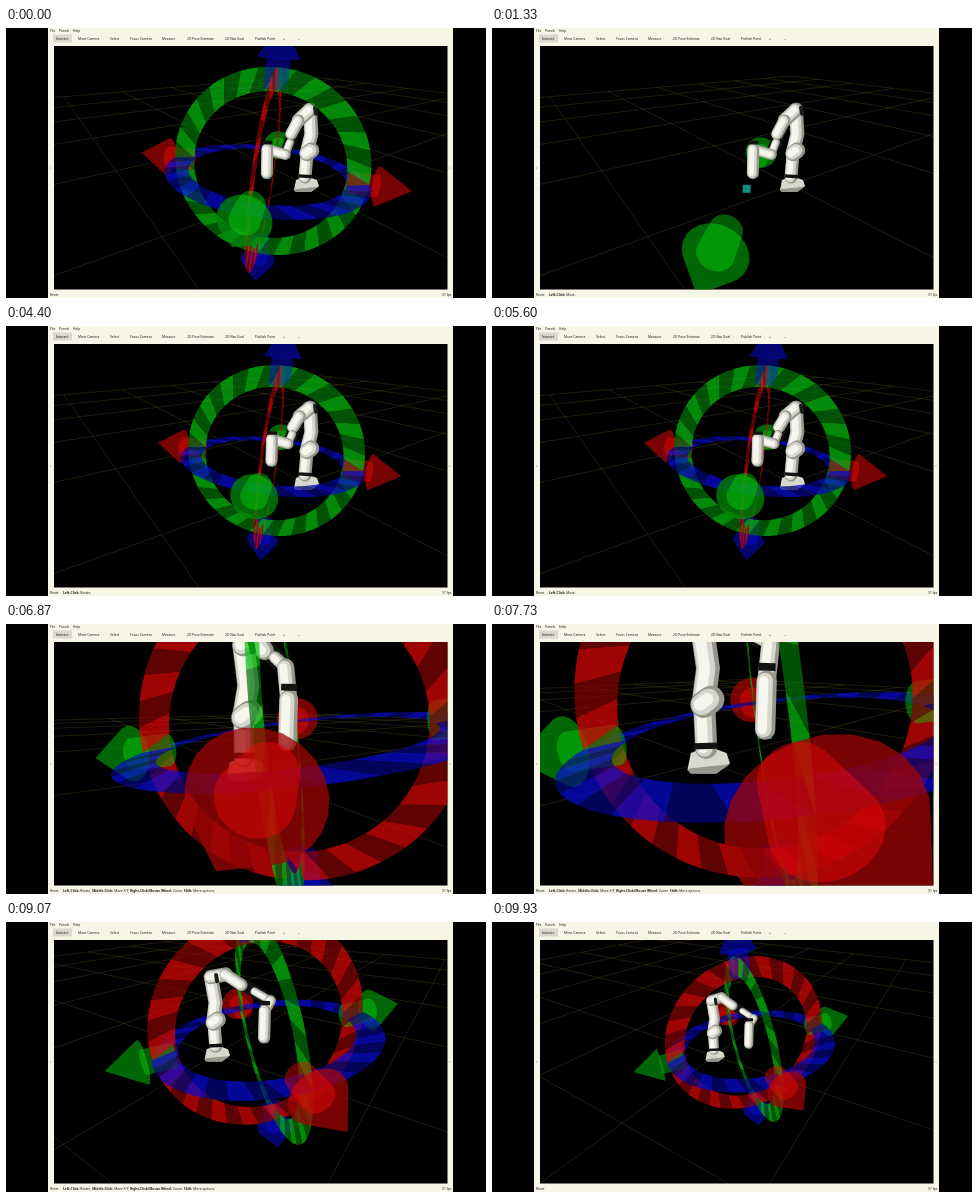
Recreate the animation shown at these times as an HTML page with a canvas. Size 480x270 px, loop 10000 ms.

```html
<!DOCTYPE html>
<html lang="en">
<head>
<meta charset="utf-8">
<style>
  html, body { margin: 0; width: 100%; height: 100%; overflow: hidden; background: #000; }
  canvas { display: block; }
</style>
</head>
<body>
<canvas id="stage" width="480" height="270"></canvas>
<script>
const ctx = document.getElementById('stage').getContext('2d');
const { sin, cos, PI } = Math;
const LOOP = 10000, STEP = LOOP / 150;
const FOCAL = 293, CX = 244.5, CY = 139.5;
const OUTER = 0.335, INNER = 0.262;
const RED = [225, 6, 6], GREEN = [4, 195, 14], BLUE = [8, 10, 215];

// Where the gizmo sits before the camera, and where the robot stands on screen
const front = { x: 0.056, y: -0.01, depth: 1, yaw: 0.17, pitch: 0.336, roll: 0.085, baseX: 299, baseY: 157, baseDepth: 1.1 };
const low = { x: 0.076, y: 0.055, depth: 0.6, yaw: 1.81, pitch: 0.22, roll: -0.145, baseX: 238, baseY: 146, baseDepth: 0.7 };
const close = { x: 0.03, y: 0.085, depth: 0.46, yaw: 1.42, pitch: 0.42, roll: -0.15, baseX: 193, baseY: 130, baseDepth: 0.6 };
const side = { x: 0.05, y: 0.08, depth: 1.2, yaw: 1.35, pitch: 0.54, roll: -0.15, baseX: 222, baseY: 134, baseDepth: 1.43 };

const keys = [
  [0, front, { slide: 0, grip: 0, lift: 0 }],
  [600, front, { slide: 0, grip: 0, lift: 0 }],
  [1330, front, { slide: 0.13, grip: 0, lift: 0 }],
  [2000, front, { slide: -0.12, grip: 0, lift: 0 }],
  [3000, front, { slide: -0.12, grip: -0.12, lift: 0.35 }],
  [3900, front, { slide: -0.12, grip: -0.12, lift: 0 }],
  [5800, front, { slide: -0.12, grip: -0.12, lift: 0 }],
  [6870, low, { slide: 0, grip: 0, lift: 1 }],
  [8530, close, { slide: 0, grip: 0, lift: 1 }],
  [9500, side, { slide: 0, grip: 0, lift: 0.8 }],
  [9670, side, { slide: 0, grip: 0, lift: 0.8 }],
  [LOOP, side, { slide: 0, grip: 0, lift: 1 }]
];

// An asterisk marks bold words
const MOVE = ['*Left-Click:', 'Move.'], ROTATE = ['*Left-Click:', 'Rotate.'];
const CAMERA_HELP = ['*Left-Click:', 'Rotate,', '*Middle-Click:', 'Move X/Y,',
  '*Right-Click/Mouse Wheel:', 'Zoom.', '*Shift:', 'More options.'];
const hints = [[0, []], [400, MOVE], [2250, ROTATE], [4600, CAMERA_HELP],
  [5350, MOVE], [5750, CAMERA_HELP], [9500, []]];
const handles = [[0, 'all'], [650, 'arrow'], [1950, 'all'], [2350, 'ring'], [3900, 'all']];

const current = (list, t) => list.filter(e => e[0] <= t).pop()[1];
const mix = (a, b, k) => a.map((v, i) => v + (b[i] - v) * k);
const blend = (a, b, k) =>
  Object.fromEntries(Object.keys(a).map(n => [n, a[n] + (b[n] - a[n]) * k]));
const rgba = (c, gain, alpha) => `rgba(${c.map(v => Math.min(255, v * gain) | 0)},${alpha})`;

function pose(t) {
  const i = keys.findIndex(k => k[0] > t);
  const [a, b] = [keys[i - 1], keys[i]];
  const k = (t - a[0]) / (b[0] - a[0]), s = k * k * (3 - 2 * k);
  return { ...blend(a[1], b[1], s), ...blend(a[2], b[2], s) };
}

function basis(yaw, pitch, roll) {
  const c = cos(roll), s = sin(roll);
  const turn = (x, y, z) => [x * c + y * s, y * c - x * s, z];
  return [
    turn(cos(yaw), -sin(yaw) * sin(pitch), sin(yaw) * cos(pitch)),
    turn(-sin(yaw), -cos(yaw) * sin(pitch), cos(yaw) * cos(pitch)),
    turn(0, cos(pitch), sin(pitch))
  ];
}

// Point at weights (u, v, w) along three axes from an origin, on screen with depth
function project(origin, axes, u, v, w) {
  const [x, y, z] = origin.map((o, i) => o + u * axes[0][i] + v * axes[1][i] + w * axes[2][i]);
  const depth = Math.max(0.04, -z);
  return [CX + FOCAL * x / depth, CY - FOCAL * y / depth, depth];
}

function fill(points, style) {
  ctx.beginPath();
  points.forEach(p => ctx.lineTo(p[0], p[1]));
  ctx.closePath();
  ctx.fillStyle = style;
  ctx.fill();
}

function hull(points) {
  const cross = (o, a, b) => (a[0] - o[0]) * (b[1] - o[1]) - (a[1] - o[1]) * (b[0] - o[0]);
  const chain = list => list.reduce((h, p) => {
    while (h.length > 1 && cross(h[h.length - 2], h[h.length - 1], p) <= 0) h.pop();
    h.push(p);
    return h;
  }, []).slice(0, -1);
  const sorted = [...points].sort((a, b) => a[0] - b[0] || a[1] - b[1]);
  return [...chain(sorted), ...chain(sorted.reverse())];
}

function ring(items, origin, axes, color) {
  const count = 36, da = PI * 2 / count, skew = da * 0.8;
  const at = (r, a) => project(origin, axes, 0, r * cos(a), r * sin(a));
  for (let i = 0; i < count; i++) {
    const a = i * da;
    const quad = [at(OUTER, a), at(OUTER, a + da / 2), at(OUTER, a + da),
      at(INNER, a + da + skew), at(INNER, a + da / 2 + skew), at(INNER, a + skew)];
    const style = rgba(color, i % 2 ? 0.6 : 1, 0.7);
    items.push([quad[1][2], () => fill(quad, style)]);
  }
}

function arrow(items, origin, axes, color, sign) {
  const circle = (d, r) => Array.from({ length: 24 }, (_, i) =>
    project(origin, axes, sign * d, r * cos(i * PI / 12), r * sin(i * PI / 12)));
  const cone = hull([...circle(0.36, 0.065), project(origin, axes, sign * 0.465, 0, 0)]);
  const shaft = hull([...circle(0.27, 0.037), ...circle(0.36, 0.037)]);
  items.push([project(origin, axes, sign * 0.36, 0, 0)[2], () => {
    fill(cone, rgba(color, 0.7, 0.76));
    fill(shaft, rgba(color, 1.1, 0.42));
  }]);
}

// The floor is turned an eighth from the gizmo
function grid(origin, axes) {
  const h = 0.55 * Math.SQRT1_2;
  const at = (i, j) => project(origin, axes, (i + j) * h, (i - j) * h, 0);
  const segment = (a, b) => {
    if (a[2] < 0.08 || b[2] < 0.08) return;
    ctx.moveTo(a[0], a[1]);
    ctx.lineTo(b[0], b[1]);
  };
  ctx.beginPath();
  for (let i = -5; i <= 5; i++) {
    for (let j = -5; j < 5; j += 0.25) {
      segment(at(i, j), at(i, j + 0.25));
      segment(at(j, i), at(j + 0.25, i));
    }
  }
  ctx.strokeStyle = 'rgba(115,115,45,0.36)';
  ctx.lineWidth = 0.7;
  ctx.stroke();
}

function robot(ground, grip, target, axes, lift, scale) {
  const up = (origin, h, red = 0) => project(origin, axes, red, 0, h).slice(0, 2);
  const near = (p, x, y) => [p[0] + x * scale, p[1] + y * scale];
  const base = up(ground, 0), shoulder = up(ground, 0.135), elbow = up(ground, 0.28);
  const hand = up(grip, -0.01), flange = up(grip, 0.075);
  const wrist = up(grip, 0.06 + 0.07 * lift, 0.06);
  const forearm = near(mix(elbow, flange, 0.27), 0, -13 * lift);

  const line = (points, width, style, dx = 0) => {
    ctx.beginPath();
    points.forEach(p => ctx.lineTo(p[0] + dx * scale, p[1]));
    ctx.strokeStyle = style;
    ctx.lineWidth = width * scale;
    ctx.stroke();
  };
  const limb = (points, width) => {
    ctx.lineCap = ctx.lineJoin = 'round';
    line(points, width, '#96968c');
    line(points, width * 0.78, '#d6d6cc', -width * 0.08);
    line(points, width * 0.46, '#f6f6ee', -width * 0.14);
  };
  const band = (p, q, from, to, width) => {
    ctx.lineCap = 'butt';
    line([mix(p, q, from), mix(p, q, to)], width, '#131313');
  };

  const cube = up(target, -0.015);
  ctx.fillStyle = '#128c80';
  ctx.fillRect(cube[0] - 4 * scale, cube[1] - 4 * scale, 8 * scale, 8 * scale);
  const foot = [[-11, 5], [-9, -5], [1, -9], [12, -5], [14, 1], [6, 7], [-9, 7]];
  fill(foot.map(p => near(base, ...p)), '#d8d8ce');
  fill(foot.map(([x, y]) => near(base, x, Math.max(y, 3 - x * 0.1))), '#96968c');
  limb([near(base, 0, -8), shoulder], 13);
  band(base, shoulder, 0.2, 0.3, 14);
  limb([shoulder, near(mix(shoulder, elbow, 0.4), 3, 0), elbow], 14);
  limb([near(shoulder, 0, 3), near(shoulder, 4, 0)], 16);
  limb([elbow, forearm], 14);
  band(forearm, wrist, 0.25, 0.85, 12);
  limb([forearm, near(mix(forearm, wrist, 0.4), -2, 0)], 12);
  limb([mix(forearm, wrist, 0.65), wrist], 8);
  limb([wrist, flange], 11);
  limb([flange, hand], 12);
  band(flange, hand, -0.36, -0.2, 10);
  ctx.lineCap = 'round';
  line([near(elbow, 5, -2), near(elbow, 6, 4)], 4, '#1d1d1d');
}

function label(text, x, y, bold) {
  ctx.font = `${bold ? 'bold ' : ''}3.3px "Noto Sans", sans-serif`;
  ctx.fillStyle = '#222';
  ctx.fillText(text, x, y);
  return x + ctx.measureText(text).width;
}

function windowFrame(t) {
  const rect = (style, ...box) => {
    ctx.fillStyle = style;
    ctx.fillRect(...box);
  };
  rect('#000', 0, 0, 480, 270);
  rect('#f6f5e6', 42, 0, 405, 270);
  rect('#d9d8cb', 47, 6.5, 19, 8);
  const row = (y, entries) => Object.entries(entries).forEach(([text, x]) => label(text, x, y));
  row(3.7, { File: 44, Panels: 53, Help: 67 });
  row(11.5, { Interact: 50, 'Move Camera': 72, Select: 104, 'Focus Camera': 124, Measure: 156,
    '2D Pose Estimate': 181, '2D Nav Goal': 219, 'Publish Point': 249, '+': 277, '–': 292 });
  row(141, { '‹': 44, '›': 443.5 });
  row(268, { Reset: 44, '31 fps': 436 });
  let x = 57;
  for (const part of current(hints, t)) {
    x = label(part.replace('*', ''), x, 268, part[0] === '*') + 0.9;
  }
  rect('#000', 48, 18, 393.5, 243.5);
}

function draw(t) {
  const p = pose(t), shown = current(handles, t);
  const [red, green, blue] = basis(p.yaw, p.pitch, p.roll);
  const world = basis(p.yaw, p.pitch, 0);
  const home = [p.x, p.y, -p.depth];
  const along = d => home.map((v, i) => v + d * green[i]);
  const center = along(p.slide);
  const ground = [(p.baseX - CX) / FOCAL, (CY - p.baseY) / FOCAL, -1].map(v => v * p.baseDepth);

  const items = [[-center[2], () =>
    robot(ground, along(p.grip), center, world, p.lift, 1.1 / p.baseDepth)]];
  const parts = [
    [RED, [red, green, blue]], [GREEN, [green, red, blue]], [BLUE, [blue, red, green]]
  ];
  for (const [color, axes] of parts) {
    const has = kind => shown === 'all' || color === GREEN && shown === kind;
    if (has('ring')) ring(items, center, axes, color);
    if (has('arrow')) [1, -1].forEach(sign => arrow(items, center, axes, color, sign));
  }

  windowFrame(t);
  ctx.save();
  ctx.beginPath();
  ctx.rect(48, 18, 393.5, 243.5);
  ctx.clip();
  grid(ground, basis(p.yaw, p.pitch + 0.07 * cos(p.yaw), 0));
  items.sort((a, b) => b[0] - a[0]).forEach(item => item[1]());
  ctx.restore();
}

const start = performance.now();
function tick() {
  const t = (performance.now() - start) % LOOP;
  draw(Math.floor((t + 4) / STEP) * STEP % LOOP);
  requestAnimationFrame(tick);
}
tick();
</script>
</body>
</html>
```
